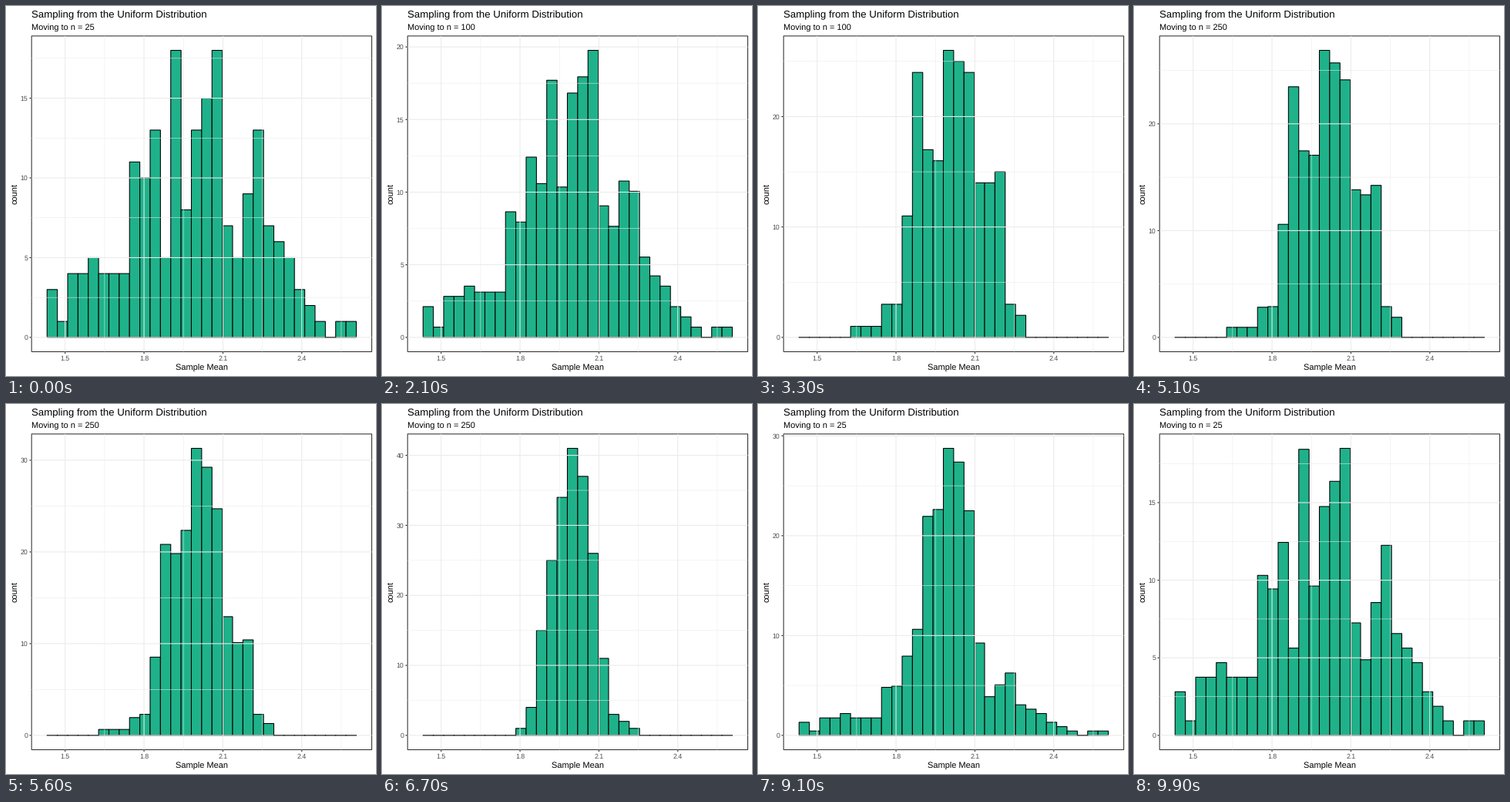
A matplotlib script that plays this animation: 480 px wide and 480 px high, repeating every 10 s.

```python
import numpy as np
import matplotlib.pyplot as plt
from matplotlib.animation import FuncAnimation
from matplotlib.patches import Rectangle

plt.rcParams.update({
    "font.family": "Liberation Sans",
    "text.hinting": "none",
    "path.snap": False,
})

SIZE, DPI = 480, 72            # at 72 dpi one point is one pixel
FRAMES, INTERVAL = 100, 100

LEFT, RIGHT, TOP, BOTTOM = 33.2, 474.5, 38.9, 448.5
PAD = 0.05 / 1.1               # share of the panel left free at each end
BAR_X = LEFT + PAD * (RIGHT - LEFT)
BAR_W = (RIGHT - LEFT) / 1.1 / 30
BASE = BOTTOM - PAD * (BOTTOM - TOP)
RISE = (BOTTOM - TOP) / 1.1
TICK = 2.75

GREEN, GRID, DARK, LABEL = "#1FB28A", "#EBEBEB", "#333333", "#4D4D4D"
THICK, THIN = 1.07, 0.53


def bins(start, counts):
    out = np.zeros(30)
    out[start:start + len(counts)] = counts
    return out


STATES = [
    (25, bins(0, [3, 1, 4, 4, 5, 4, 4, 4, 11, 10, 13, 5, 18, 8, 13,
                  15, 18, 7, 5, 9, 13, 7, 6, 5, 3, 2, 1, 0, 1, 1])),
    (100, bins(5, [1, 1, 1, 3, 3, 11, 24, 17, 16, 26, 25, 24, 14, 14, 15, 3, 2])),
    (250, bins(9, [1, 4, 15, 25, 34, 41, 37, 26, 11, 3, 2, 1])),
]
# last resting frame of each state, first resting frame of the next one
MOVES = [(16, 33), (50, 67), (84, 100)]


def pose(frame):
    """Sample size in the subtitle and the bar heights."""
    for i, (start, end) in enumerate(MOVES):
        n, now = STATES[i]
        if frame <= start:
            return n, now
        if frame < end:
            n, new = STATES[(i + 1) % 3]
            return n, now + (new - now) * (frame - start) / (end - start)


fig = plt.figure(figsize=(SIZE / DPI, SIZE / DPI), dpi=DPI, facecolor="white")
ax = fig.add_axes([0, 0, 1, 1])


def text(x, y, s, size=11, color="black", ha="left", **kw):
    ax.text(x, y, s, fontsize=size, color=color, ha=ha, va="baseline", **kw)


def draw_grid(xs, ys, width):
    ax.hlines(ys, LEFT, RIGHT, colors=GRID, linewidth=width)
    ax.vlines(xs, TOP, BOTTOM, colors=GRID, linewidth=width)


def draw_bars(heights):
    for i, h in enumerate(heights):
        x = BAR_X + i * BAR_W
        if h > 0:
            ax.add_patch(Rectangle((x, BASE - h), BAR_W, h, facecolor=GREEN,
                                   edgecolor="black", linewidth=THICK))
        else:
            ax.hlines(BASE, x - THICK / 2, x + BAR_W + THICK / 2,
                      colors="black", linewidth=THICK)


def draw(frame):
    n, counts = pose(frame)
    peak = counts.max()
    scale = RISE / peak
    step = 10 if peak > 25.3 else 5

    ax.clear()
    ax.set_axis_off()
    ax.set_xlim(0, SIZE)
    ax.set_ylim(SIZE, 0)

    x_major = 76.7 + 102.35 * np.arange(4)
    y_values = np.arange(0, peak * 1.05, step)
    y_minor = np.arange(step / 2, peak * 1.05, step)
    y_major = BASE - y_values * scale

    draw_grid(x_major + 102.35 / 2, BASE - y_minor * scale, THIN)
    draw_grid(x_major, y_major, THICK)
    draw_bars(counts * scale)

    ax.add_patch(Rectangle((LEFT, TOP), RIGHT - LEFT, BOTTOM - TOP,
                           fill=False, edgecolor=DARK, linewidth=THICK))
    ax.hlines(y_major, LEFT - TICK, LEFT, colors=DARK, linewidth=THICK)
    ax.vlines(x_major, BOTTOM, BOTTOM + TICK, colors=DARK, linewidth=THICK)

    for x, s in zip(x_major, ("1.5", "1.8", "2.1", "2.4")):
        text(x, 460, s, 8.8, LABEL, "center")
    for y, v in zip(y_major, y_values):
        text(LEFT - TICK - 2.2, y + 3.15, f"{v:.0f}", 8.8, LABEL, "right")

    text(LEFT, 15, "Sampling from the Uniform Distribution", 13.2)
    text(LEFT, 32, f"Moving to n = {n}")
    text((LEFT + RIGHT) / 2, 473, "Sample Mean", ha="center")
    text(14, (TOP + BOTTOM) / 2, "count", ha="center",
         rotation=90, rotation_mode="anchor")
    return []


anim = FuncAnimation(fig, draw, frames=FRAMES, interval=INTERVAL,
                     init_func=lambda: draw(0), repeat=True, repeat_delay=0)
plt.show()
```
